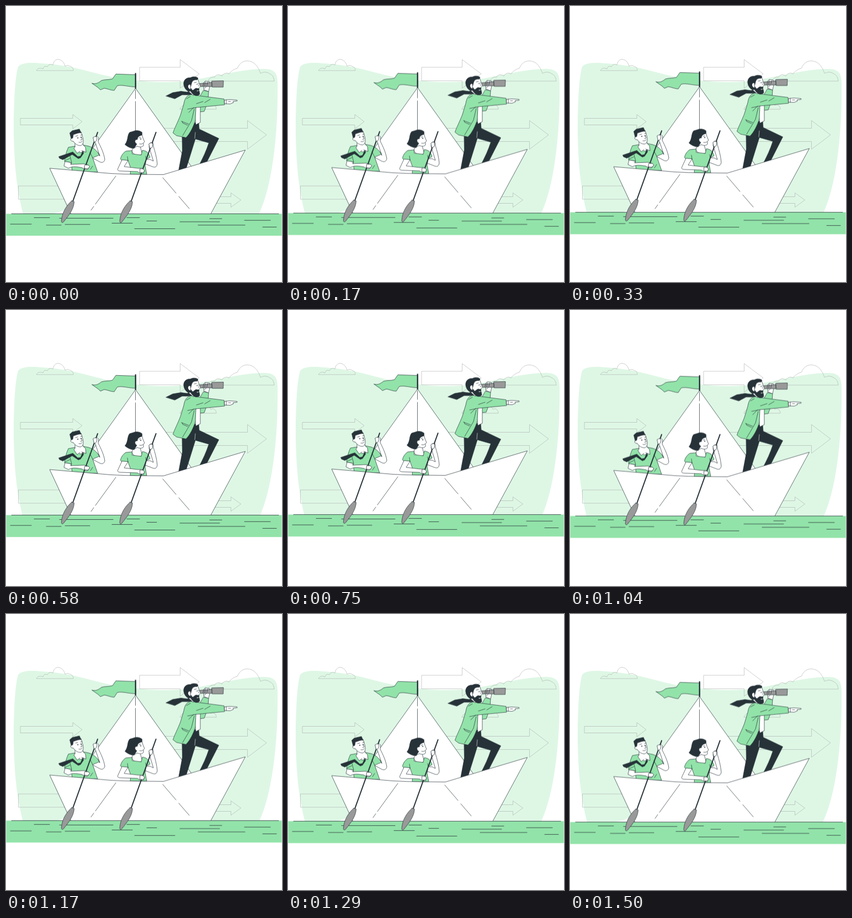
Write an HTML page that moves like this. It is 500 by 500 pixels and loops after 1.54 s.

```html
<!DOCTYPE html>
<html lang="en">
<head>
<meta charset="utf-8">
<title>Paper boat</title>
<style>
  html, body { margin: 0; width: 100%; height: 100%; overflow: hidden; background: #fff; }
  svg { display: block; width: 100%; height: 100%; }
  .outline { fill: none; stroke: #a8aea9; stroke-width: .6; }
  .ship { stroke: #263238; stroke-width: .7; stroke-linejoin: round; stroke-linecap: round; animation: bob 770ms -50ms linear infinite alternate; }
  .w { fill: #fff; }
  .g { fill: #92e3a9; }
  .d { fill: #263238; }
  .s { fill: #999; }
  .n { fill: none; }
  @keyframes bob {
    from { transform: translateY(.5px); }
    to { transform: translateY(-6.2px); }
  }
</style>
</head>
<body>
<svg viewBox="0 0 500 500">
  <defs>
    <g id="oar">
      <path class="n" stroke-width="2" d="M166 229 121 354"/>
      <path class="s" d="M119 353 123.500 354.500C123 368 114 379 104.500 391 102 394 99.500 392 100.500 388 102 373 110 361 119 353z"/>
    </g>
  </defs>

  <path fill="#def7e5" d="M22 110C28 102 47 102 66 104 135 109 158 124 212 132 260 138 300 141 345 133 385 126 430 114 466 114 488 114 492 122 492 142 493 240 481 330 458 377H360L120 364C106 368 96 376 80 377H31C20 335 14 285 14 220 14 180 16 130 22 110z"/>

  <g class="outline">
    <path d="M55 117H122C122 113 120 110 117 110 114 107 110 107 107 109 105 102 101 97 94 96.500 89 97 86 101 85 107 81 104 77 106 75 110 71 108 68 110 67 114 62 111 57 113 55 117z"/>
    <path d="M366 136H486C485 129 483 125 478 123 473 119 467 119 461 122 457 110 450 100 438 99.500 429 99 423 104 419 113 413 114 408 118 404 123 399 120 394 122 391 127 386 123 380 124 378 129 372 128 368 131 366 136z"/>
    <path d="M315 187H381C381 181 376 177 371 180 369 174 362 170 356 172 350 168 338 171 336 179 329 175 318 179 315 187z"/>
    <path d="M242 111H315.500V97L350 123 315.500 149V135.500H242z"/>
    <path d="M26 203.500H121V196.500L138 209.500 121 222.500V215.500H26z"/>
    <path d="M270 221.500H437.500V207.500L472 233.500 437.500 259.500V245.500H270z"/>
    <path d="M22.500 326H150V350H22.500z"/>
    <path d="M340 345.500H407.500V338.500L425.500 351.500 407.500 364.500V357.500H340z"/>
  </g>

  <g class="ship">
    <!-- sail and flag -->
    <path class="w" d="M234.500 149.500 117 314H352z"/>
    <path class="n" d="M234.500 152V168M234.500 173V232"/>
    <path class="g" d="M235 124.500 199 123.300 193 132C187 134 179 133 173 135 167 140 162 142 155.500 140L167 148 171 152 178 149C185 150 190 153 196 153L201.500 144.500C211 142 223 147 235 146.500z"/>
    <path class="n" stroke-width="2.300" stroke-linecap="butt" d="M234.700 121.500V150"/>

    <!-- water -->
    <path class="g" stroke="none" d="M.5 376.500H499.500V416.300H.5z"/>
    <path class="n" stroke-width=".8" d="M10 376.500H494M51 383.500H79M97 384.500H194M8 395.200H46M73 397H100M107 395.800H152M192 393.500H229M219 383.500H242M255 389.500H273M233 403.500H306M315 391H387M369 385.300H391M348 397H433M432 388.300H479M465 400.500H490"/>

    <!-- rower, left -->
    <path class="w" d="M150 258C160 260 168 264 170 272L159 239 164 235 168 239 167 246C172 256 177 266 179 278 178 283 174 285 169 282L156 275z"/>
    <path class="g" d="M125 254 113 256C109 264 107 274 106 282L118 284 120 299 166 301 157 275 169 270C165 262 159 257 150 254L140 252z"/>
    <path class="n" d="M157 275 152 265M119 284 116 272M153 296 157 290M107 280 116 276"/>
    <path class="w" d="M125 246V257L134 266 144 263 139 249z"/>
    <path class="w" d="M125 255 123 258 129 267 134 263M140 252 144 256 145 265 137 262"/>
    <path class="w" d="M119 232 136 228 139.500 240C141 248 139 252 135 253 130 253 125 250 122 245 117 246 115 240 120 239z"/>
    <path class="d" d="M118 240 115.500 230 120 226 133 223 136 230C131 229 127 232 122 233L121 239z"/>
    <path class="n" d="M126 236 130 235M135 234 138 233.500M136 237 138 242 135 243M132 247Q136 248 138 245"/>
    <circle class="d" cx="130" cy="239" r=".6"/><circle class="d" cx="136" cy="238" r=".6"/>
    <path class="d" d="M139 263 135 272 130 273 121 264.500 95.500 273 97 276 103 278.500 120 269 131 276.500 135 275 140.500 267z"/>
    <path class="w" d="M107 282 105 290 113 294C120 290 127 291 138 293L142 296 148 296 151.500 291 149 288 141 286 117 287 118 284z"/>

    <!-- rower, right -->
    <path class="w" d="M251 278 261 278 267 281 259 255 261 248 266 247 267 254C270 264 273 274 274 286 273 292 270 293 265 291L252 286z"/>
    <path class="w" d="M230 254 228 264 236 272 247 269 243 254z"/>
    <path class="g" d="M228 262 217 263C211 267 208 273 207.500 277L211 282 221 280 226 294 225 305H255L252 290 254 278 261 274C259 267 255 262 247 261.500L245 270 229 268z"/>
    <path class="n" d="M221 280 220 273M254 278 253 272"/>
    <path class="w" d="M210 279 203 294C201 298 204 299 208 299L238 300 243 303 249 303 251 298 247 294 239 294 214 291 221 280z"/>
    <path class="w" d="M232 237 246 231 248 239 251 246 249 248 249 253C247 256 242 256 238 254L232 257z"/>
    <path class="d" d="M234 226 224 229C219 235 222 243 215.500 251 220 255 226 258 232 258L237 250C232 247 233 241 238 242 238 237 242 235 246 234L246.500 229C243 226 238 225 234 226z"/>
    <path class="n" d="M241 239 244 238M242 250Q246 251 248 249"/>
    <circle class="d" cx="244" cy="241" r=".6"/>

    <!-- lookout -->
    <path class="d" d="M319 235 319.500 262 312 302 324 302 343 241 367.500 248C363 262 357 275 349 290H360L385.500 240 350 223 349 211 340 212z"/>
    <path class="n" stroke="#fff" stroke-width=".6" d="M342 240 343 229"/>
    <path class="g" d="M358 153 367 155 366 169C364 178 361 186 359 191L350 192 348 170z"/>
    <path class="w" d="M341 182 352 180 352 211 344 215z"/>
    <path class="w" d="M358 139 361 136 368 137 369 146 367 155 359 152z"/>
    <path class="s" d="M351 140.500 373 138.500V146L352 146zM373 136 394 135.500 393.500 147 374 147z"/>
    <path class="n" d="M358 140 357 145M361 137 360 145M365 138 364 144M360 149 363 146"/>
    <path class="g" d="M338 160C327 161 324 167 322 178L316 198C311 211 305 222 302.500 230L309 235 326 238.500C333 232 340 218 343 207L344 184 396 179 395 168.500 344 162z"/>
    <path class="n" d="M344 184 329 187M331 193 340 184M341 187 336 208 320 235M345 177 357 173M360 175 370 169M318 209 331 214M319 209 320 212 329 216M327 168 334 164"/>
    <path class="w" d="M396 170.500 405 169.500 418.500 170.500 419 172 411 173 412 175 406 177.500 396 177z"/>
    <path class="n" d="M399 170V177.500M403 173H407"/>
    <path class="d" d="M290 163 302 157 317 154.500 328 156 336 153 338 160 329 161 319 161 306 168z"/>
    <path class="w" d="M328 139 347 131 350 140 352.500 146 349 149 350 158 339 162 330 154z"/>
    <path class="d" d="M323 146C319 136 326 129 334 130 339 127 346 128 348 131L346 134C339 133 337 137 336 141L334 148 338 153C341 152 342 149 345 149L350 150 349 153 345 153 346 155 350 154 351 160C347 164 341 163 337 158L334 154C330 156 325 152 323 146z"/>
    <path class="w" stroke="none" d="M334 143C330 141 329 146 331 149L334 151z"/>
    <path class="n" d="M341 139 345 138M345 142 349 141M348 144 350 145"/>

    <!-- hull and oars -->
    <path class="w" d="M79.500 294 190 303.500C222 305.500 255 305 285 305.500L433.500 261 371 376.500H118z"/>
    <path class="n" d="M199 308 162 359M159 363 154 370M284 311 308 339M313 345 332 367"/>
    <use href="#oar"/>
    <use href="#oar" x="105.700"/>
    <path class="w" d="M158 238 162 236 165 239 164 244 160 247zM143 288 149 288 152 291 148 295 142 294zM259 250 263 247.500 266 250 265 256 261 258zM243 295 248 295 251 298 249 302 243 302z"/>
  </g>
</svg>
</body>
</html>
```
